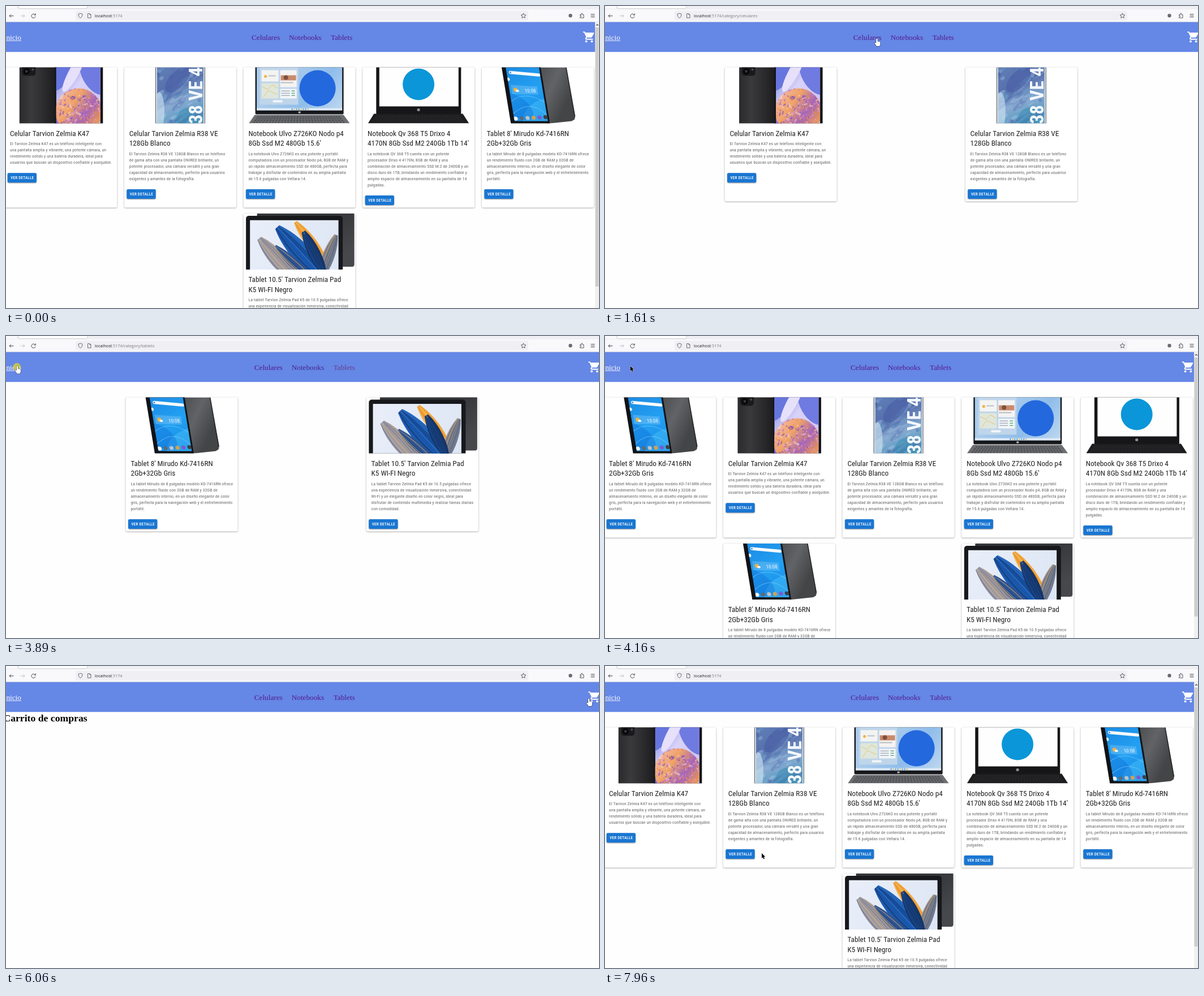
These frames come from a looping animation (1048x534 px, 8000 ms). An HTML page with a canvas:

```html
<!DOCTYPE html>
<html lang="es">
<head>
<meta charset="utf-8">
<title>Tienda</title>
<style>
html, body { margin: 0; width: 100%; height: 100%; overflow: hidden; background: #fefefe; }
canvas { display: block; }
</style>
</head>
<body>
<canvas id="stage" width="1048" height="534"></canvas>
<script>
const W = 1048, H = 534, LOOP = 8000;
const SERIF = '"Liberation Serif", "Times New Roman", serif';
const UI = '"Open Sans", "Noto Sans", sans-serif';
const PURPLE = '#551a8b', BLUE = '#6587e6';
const condensed = (size, weight = 400) =>
  `condensed ${weight} ${size}px "Roboto Condensed", Roboto, sans-serif`;

let squeeze = 0; // tighter tracking when no condensed face is installed

function setFont(c, font, track = 0) {
  const narrow = font.startsWith('condensed');
  c.fontStretch = narrow ? 'condensed' : 'normal';
  c.font = font;
  c.letterSpacing = (track + (narrow ? squeeze : 0)) * font.match(/([\d.]+)px/)[1] + 'px';
}

function write(c, str, x, y, font, color, track) {
  setFont(c, font, track);
  c.fillStyle = color;
  c.fillText(str, x, y);
  return c.measureText(str).width;
}

function rect(c, x, y, w, h, color, r = 0) {
  c.fillStyle = color;
  c.beginPath();
  c.roundRect(x, y, w, h, r);
  c.fill();
}

function disc(c, x, y, r, color, ry = r, turn = 0) {
  c.fillStyle = color;
  c.beginPath();
  c.ellipse(x, y, r, ry, turn, 0, 7);
  c.fill();
}

function poly(c, color, ...pts) {
  c.fillStyle = color;
  c.beginPath();
  for (let i = 0; i < pts.length; i += 2) c.lineTo(pts[i], pts[i + 1]);
  c.fill();
}

function line(c, d, color = '#4a4a52', width = 1) {
  c.strokeStyle = color;
  c.lineWidth = width;
  c.stroke(new Path2D(d));
}

function blend(c, x0, y0, x1, y1, ...colors) {
  const g = c.createLinearGradient(x0, y0, x1, y1);
  colors.forEach((col, i) => g.addColorStop(i / (colors.length - 1), col));
  return g;
}

function clipped(c, x, y, w, h, r, draw) {
  c.save();
  c.beginPath();
  c.roundRect(x, y, w, h, r);
  c.clip();
  draw();
  c.restore();
}

function random(seed) {
  return () => (seed = (seed * 16807) % 2147483647) / 2147483647;
}

// Product pictures, each 198 by 99

function phoneDark(c) {
  rect(c, 25.5, -5, 66, 110, blend(c, 25, 0, 90, 0, '#2a2a2c', '#3a3a3c', '#2c2c2e', '#1c1c1e'));
  rect(c, 30, -8, 24, 23, '#1a1a1c', 5);
  disc(c, 38, 7, 5.5, '#060607');
  disc(c, 38, 7, 2.5, '#30343c');
  disc(c, 49, 4, 2, '#4a4a4e');
  rect(c, 88, -5, 85, 110, '#141418');
  clipped(c, 90.5, -2, 78, 103, 0, () => {
    rect(c, 90, 0, 80, 99, blend(c, 90, 0, 168, 60, '#6f7fe2', '#d9d2f8', '#cfc5f4'));
    disc(c, 94, 6, 24, '#6676de', 40, .5);
    disc(c, 160, 12, 24, '#6f7be0', 40, -.5);
    disc(c, 122, 8, 9, '#e6e0fb', 40, .5);
    disc(c, 92, 94, 12, '#7a62d0', 26);
    c.beginPath();
    c.arc(130, 78, 41, 0, 7);
    c.clip();
    rect(c, 88, 36, 84, 64, blend(c, 95, 50, 165, 99, '#f3b3a4', '#f0a468', '#a765b8', '#ee9a4c'));
    const rnd = random(41);
    const tones = ['#f39a36', '#9a62cc', '#f9d4c4', '#f0935a', '#7b4ab2', '#e2a4d4'];
    c.globalAlpha = .6;
    for (let i = 0; i < 260; i++) {
      disc(c, 89 + rnd() * 82, 36 + rnd() * 64, .8 + rnd() * 2.8,
        tones[i % 6], .6 + rnd() * 1.4, rnd() * 3);
    }
  });
}

function phoneBlue(c) {
  rect(c, 55, -5, 88, 110, '#54585f');
  rect(c, 56, -5, 86, 110, '#d5dde4');
  clipped(c, 58, 0, 82, 99, 0, () => {
    rect(c, 58, 0, 82, 99, blend(c, 70, 0, 110, 99, '#5f7db6', '#5871ae', '#86a9d0', '#4c96bc'));
    const rnd = random(77);
    const tones = ['#465da2', '#8fb6d8', '#5874b2', '#6aa4ca', '#a9c8e2', '#4c64a8'];
    c.globalAlpha = .35;
    for (let i = 0; i < 90; i++) {
      disc(c, 58 + rnd() * 78, rnd() * 99, 3 + rnd() * 12, tones[i % 6], 1.5 + rnd() * 3, -.9 + rnd() * .5);
    }
    c.globalAlpha = .6;
    disc(c, 94, 22, 28, '#4a60a6', 14, -.8);
    disc(c, 112, 88, 20, '#3f8cb4', 16, -.6);
    disc(c, 62, 78, 9, '#d2e8f4', 34);
  });
  clipped(c, 55, 0, 88, 99, 0, () => {
    c.translate(138, 100);
    c.rotate(-Math.PI / 2);
    write(c, '38 VE 4', 0, 0, condensed(33, 700), '#f4f8fc');
  });
}

function keyboard(c, top, dark, key) {
  poly(c, dark, 20, top, 177, top, 188, 99, 9.5, 99);
  for (let row = 0; row < 4; row++) {
    const y = top + 3 + row * 3, spread = 74 + row * 2.5;
    for (let i = 0; i < 30; i++) rect(c, 98.7 - spread + i * spread / 15, y, 3.6, 1.6, key);
  }
}

function laptopBlue(c) {
  rect(c, 21, -5, 156, 88, '#17181b', 2);
  rect(c, 23.5, -5, 151, 81, blend(c, 90, 0, 174, 70, '#a9cbec', '#8fbdea', '#bcd6ef'));
  disc(c, 131, 37, 32, '#2468de');
  rect(c, 29, 0, 68, 66, '#bfd5ea');
  rect(c, 32, 5, 30, 20, '#f3f4f2', 1);
  disc(c, 39, 16, 2.5, '#f0b23c');
  rect(c, 44, 14, 13, 2, '#b9c2cc');
  rect(c, 32, 28, 30, 27, '#dfe7dc', 1);
  line(c, 'M33 34l10 5 8-8 10 6M35 53l9-12 16 7', '#e8c56c', 1);
  rect(c, 65, 5, 29, 30, '#f5f3f2', 1);
  rect(c, 66, 14, 27, 9, '#c98a6c');
  disc(c, 75, 18, 4, '#7d5140');
  rect(c, 66, 26, 22, 2, '#b8bcc4');
  rect(c, 65, 38, 29, 17, '#f3f5f8', 1);
  for (let i = 0; i < 3; i++) {
    rect(c, 67, 41 + i * 4, 15, 1.5, '#a7b1bf');
    rect(c, 85, 41 + i * 4, 6, 1.5, '#5fae7e');
  }
  rect(c, 52, 58, 17, 4, '#f2f5f8', 1);
  rect(c, 23.5, 72, 151, 4, '#dce8f4');
  for (let i = 0; i < 8; i++) rect(c, 85 + i * 4, 73, 2, 2, ['#2f7de0', '#e0a840', '#3b9a8c'][i % 3]);
  rect(c, 97, 78, 4, 3, '#b7babf');
  keyboard(c, 84, '#6c6d71', '#434448');
}

function laptopDark(c) {
  rect(c, 24, -5, 150, 88, '#161618', 2);
  rect(c, 29.5, -5, 140, 74, '#fefefe');
  disc(c, 98.8, 30, 28, '#0a96d8');
  disc(c, 98.8, 75, 2.6, '#8d9094');
  keyboard(c, 82, '#1d1d1f', '#2b2b2d');
}

function tabletGrey(c) {
  poly(c, blend(c, 100, 0, 165, 30, '#4c4d4f', '#626366', '#444547'),
    96, 0, 149, 0, 165, 87, 164, 92, 159, 95, 121, 99, 112, 99);
  line(c, 'M149 0L164.500 87', '#232425', 1.5);
  c.save();
  c.transform(1, 0, .165, 1, 0, 0);
  rect(c, 35, -3, 69, 105, '#111316');
  clipped(c, 42, -2, 59, 97, 0, () => {
    rect(c, 42, 0, 60, 96, blend(c, 42, 0, 100, 96, '#1b8be4', '#23a0f2', '#1487e2'));
    disc(c, 98, 88, 44, 'rgba(80,200,250,.4)', 30, -.5);
    disc(c, 52, 70, 30, 'rgba(10,100,210,.35)', 18, .7);
    line(c, 'M42 60Q70 40 101 62M42 82Q75 55 101 84', 'rgba(160,225,255,.45)', 1);
    c.lineCap = 'round';
    line(c, 'M49 9L98 13.500', '#f6f9fc', 5.5);
    disc(c, 49, 9, 1.5, '#4a8be0');
    disc(c, 43, 21, 3, '#e8f2fa');
    poly(c, 'rgba(255,255,255,.18)', 46, 31, 92, 34, 92, 48, 46, 47);
    disc(c, 53, 39.5, 3.5, '#f3b23e');
    disc(c, 56, 41.5, 3, '#f4f7fa', 2);
    write(c, '10:08', 69, 44, condensed(9), '#eef7ff');
    ['#f2f4f7', '#5b6b76', '#b9c3cb', '#cfa253', '#7a5ad0', '#3c3f45'].forEach((col, i) =>
      disc(c, 45 + i * 10.6, 90.500 - i * .5, 3.6, col));
  });
  c.restore();
}

// A tapered plume from its root to its tip, with streaks along it
function plume(c, seed, x0, y0, x1, y1, width, ...tones) {
  const rnd = random(seed), length = Math.hypot(x1 - x0, y1 - y0);
  const edge = s => c.bezierCurveTo(length * .3, s * width, length * .75, s * width * .8, length, s * width * .2);
  c.save();
  c.translate(x0, y0);
  c.rotate(Math.atan2(y1 - y0, x1 - x0));
  c.beginPath();
  c.moveTo(0, 0);
  edge(-1);
  c.lineTo(length * .94, 0);
  c.lineTo(length, width * .2);
  c.bezierCurveTo(length * .75, width * .8, length * .3, width, 0, 0);
  c.fillStyle = tones[0];
  c.fill();
  c.globalAlpha = .55;
  for (let i = 0; i < width * 1.5; i++) {
    c.strokeStyle = tones[i % tones.length];
    c.lineWidth = .8 + rnd() * 1.2;
    c.beginPath();
    c.moveTo(0, 0);
    edge(rnd() * 2 - 1);
    c.stroke();
  }
  c.restore();
}

function tabletFeather(c) {
  rect(c, 24, -2, 172, 96, blend(c, 160, 0, 196, 60, '#35363a', '#47484c'), 4);
  rect(c, 4.5, 4, 171, 105, '#17181b', 5);
  clipped(c, 11.5, 11.5, 156.5, 88, 1, () => {
    rect(c, 11.5, 11.5, 157, 88, blend(c, 12, 12, 168, 99, '#e9eef9', '#dde6f4'));
    plume(c, 3, 100, 125, 28, 44, 20, '#a89c98', '#c8b294', '#8894b4', '#6a7698');
    plume(c, 5, 150, 92, 92, 15, 14, '#f0a030', '#e8932a', '#f5bd66');
    plume(c, 11, 134, 120, 164, 38, 15, '#6f7890', '#c79a62', '#2d5288', '#b9a590');
    plume(c, 7, 150, 122, 60, 24, 24, '#1c5cb2', '#134a9c', '#2f74c6', '#173a72');
    plume(c, 9, 146, 112, 106, 32, 15, '#16386e', '#1d4d92', '#122b56');
    plume(c, 13, 128, 122, 56, 58, 12, '#274c8a', '#365f9e', '#c8a878');
  });
}

const products = {
  dark: { art: phoneDark, title: ['Celular Tarvion Zelmia K47'], body: [
    'El Tarvion Zelmia K47 es un teléfono inteligente con',
    'una pantalla amplia y vibrante, una potente cámara, un',
    'rendimiento sólido y una batería duradera, ideal para',
    'usuarios que buscan un dispositivo confiable y asequible.'] },
  blue: { art: phoneBlue, title: ['Celular Tarvion Zelmia R38 VE', '128Gb Blanco'], body: [
    'El Tarvion Zelmia R38 VE 128GB Blanco es un teléfono',
    'de gama alta con una pantalla ONIRED brillante, un',
    'potente procesador, una cámara versátil y una gran',
    'capacidad de almacenamiento, perfecto para usuarios',
    'exigentes y amantes de la fotografía.'] },
  slim: { art: laptopBlue, title: ['Notebook Ulvo Z726KO Nodo p4', "8Gb Ssd M2 480Gb 15.6'"], body: [
    'La notebook Ulvo Z726KO es una potente y portátil',
    'computadora con un procesador Nodo p4, 8GB de RAM y',
    'un rápido almacenamiento SSD de 480GB, perfecta para',
    'trabajar y disfrutar de contenidos en su amplia pantalla',
    'de 15.6 pulgadas con Veltara 14.'] },
  work: { art: laptopDark, title: ['Notebook Qv 368 T5 Drixo 4', "4170N 8Gb Ssd M2 240Gb 1Tb 14'"], body: [
    'La notebook QV 368 T5 cuenta con un potente',
    'procesador Drixo 4 4170N, 8GB de RAM y una',
    'combinación de almacenamiento SSD M.2 de 240GB y un',
    'disco duro de 1TB, brindando un rendimiento confiable y',
    'amplio espacio de almacenamiento en su pantalla de 14',
    'pulgadas.'] },
  grey: { art: tabletGrey, title: ["Tablet 8' Mirudo Kd-7416RN", '2Gb+32Gb Gris'], body: [
    'La tablet Mirudo de 8 pulgadas modelo KD-7416RN ofrece',
    'un rendimiento fluido con 2GB de RAM y 32GB de',
    'almacenamiento interno, en un diseño elegante de color',
    'gris, perfecta para la navegación web y el entretenimiento',
    'portátil.'] },
  feather: { art: tabletFeather, title: ["Tablet 10.5' Tarvion Zelmia Pad", 'K5 WI-FI Negro'], body: [
    'La tablet Tarvion Zelmia Pad K5 de 10.5 pulgadas ofrece',
    'una experiencia de visualización inmersiva, conectividad',
    'Wi-Fi y un elegante diseño en color negro, ideal para',
    'disfrutar de contenido multimedia y realizar tareas diarias',
    'con comodidad.'] },
};

function card(c, name, x, y, h) {
  const { art, title, body } = products[name];
  c.save();
  c.shadowColor = 'rgba(0,0,0,.38)';
  c.shadowBlur = 2.5;
  c.shadowOffsetY = .8;
  rect(c, x, y, 198, h, '#fff', 2.2);
  c.restore();
  clipped(c, x, y, 198, 99, [2.2, 2.2, 0, 0], () => {
    c.translate(x, y);
    art(c);
  });
  title.forEach((s, i) => write(c, s, x + 8.8, y + 121 + i * 17.7, condensed(13.26), '#212121'));
  const top = y + 137.3 + (title.length - 1) * 17.7;
  body.forEach((s, i) => write(c, s, x + 8.8, top + i * 11.05, condensed(7.73), '#666', .0107));
  const by = top + 5.2 + body.length * 11.05;
  c.save();
  c.shadowColor = 'rgba(0,0,0,.4)';
  c.shadowBlur = 2;
  c.shadowOffsetY = 1;
  rect(c, x + 4.4, by, 51.3, 17, '#1976d2', 2.2);
  c.restore();
  write(c, 'VER DETALLE', x + 9.9, by + 11.1, condensed(7.18, 500), '#fff', .0286);
}

function browserBar(c, path, reader) {
  rect(c, 0, 0, W, 6, '#f0f0f4');
  rect(c, 0, 6, W, 22, '#f9f9fb');
  rect(c, 0, 0, 19.5, 4.5, '#fafafc');
  c.save();
  c.shadowColor = 'rgba(0,0,0,.4)';
  c.shadowBlur = 2;
  rect(c, 22, -6, 121.5, 10, '#fff', 2);
  c.restore();
  rect(c, 123, 8.500, 800, 17, '#f0f0f4', 2);
  line(c, 'M13.500 17.500H6M9 14.500l-3 3 3 3');
  line(c, 'M25.500 17.500H33M30 14.500l3 3-3 3', '#c3c3c8');
  line(c, 'M51.500 15.500a3.600 3.600 0 1 0 .6 3M52.400 13.200v2.800h-2.800');
  line(c, 'M131.500 13l3.600 1.300q.2 5-3.600 7.200q-3.800-2.200-3.600-7.200z', '#5b5b62', .9);
  line(c, 'M144.500 13.500h3.500l2 2v5.500h-5.500zM148 13.500v2h2', '#5b5b62', .9);
  const host = write(c, 'localhost', 157, 20, `7.2px ${UI}`, '#1c1b22');
  write(c, ':5174' + path, 157 + host, 20, `7.2px ${UI}`, '#77777e');
  line(c, 'M914.500 12.800l1.300 2.800 3 .4-2.200 2.100.5 3-2.600-1.500-2.600 1.500.5-3-2.200-2.100 3-.4z', '#4a4a52', .9);
  if (reader) line(c, 'M896 13.500h6.500v7.500H896zM897.500 15.800h3.500M897.500 17.500h3.500M897.500 19.200h2', '#4a4a52', .9);
  disc(c, 997.500, 17, 3.2, '#6b6b74');
  line(c, 'M1014.500 15.500h2v-1.500a1.200 1.200 0 0 1 2.400 0v1.500h2.100v5.500h-6.500v-1.800h1a1.100 1.100 0 0 0 0-2.200h-1z', '#4a4a52', .9);
  line(c, 'M1033.500 14.500h7M1033.500 17h7M1033.500 19.500h7', '#4a4a52', .9);
}

function cart(c, x) {
  c.save();
  c.translate(x, 43.2);
  c.scale(.97, .97);
  c.fillStyle = '#fff';
  c.fill(new Path2D('M1 2v2h2l3.600 7.600-1.350 2.450C4.500 15.400 5.500 17 7 17h12v-2H7.420' +
    'q-.3-.1-.22-.37l.9-1.630h7.450q1.200 0 1.750-1.030l3.580-6.490Q21.300 4 20 4H5.210l-.94-2z'));
  disc(c, 7, 20, 2, '#fff');
  disc(c, 17, 20, 2, '#fff');
  c.restore();
}

const column = i => -1.7 + 210.65 * i;
const row = (names, y, h) => names.flatMap((n, i) => n ? [[n, column(i), y, h]] : []);
const pair = (a, b, h) => [[a, 211.6, 108.5, h], [b, 636.8, 108.5, h]];

const HOME = { path: '', home: true, cards: [
  ...row(['dark', 'blue', 'slim', 'work', 'grey'], 108.5, 248),
  ...row([, , 'feather'], 367, 248)] };
const HOME_REPEAT = { path: '', home: true, cards: [
  ...row(['grey', 'dark', 'blue', 'slim', 'work'], 108.5, 248),
  ...row([, 'grey', , 'feather'], 367, 248)] };
const PHONES = { path: '/category/celulares', cards: pair('dark', 'blue', 237) };
const NOTEBOOKS = { path: '/category/notebooks', reader: true, cards: pair('slim', 'work', 248) };
const TABLETS = { path: '/category/tablets', cards: pair('grey', 'feather', 237) };
const CART = { path: '', heading: 'Carrito de compras', cards: [] };

const schedule = [[0, HOME], [1470, PHONES], [2350, NOTEBOOKS], [3090, TABLETS],
  [4030, HOME_REPEAT], [6060, CART], [7020, HOME]];

function render(page) {
  const canvas = document.createElement('canvas');
  canvas.width = W;
  canvas.height = H;
  const c = canvas.getContext('2d');
  rect(c, 0, 0, W, H, '#fefefe');
  page.cards.forEach(args => card(c, ...args));
  if (page.heading) write(c, page.heading, -4.6, 98, `bold 17.68px ${SERIF}`, '#000');
  browserBar(c, page.path, page.reader);
  rect(c, 0, 28.2, W, 53, BLUE);
  rect(c, 0, 27.7, W, .5, '#ccc');
  write(c, 'Inicio', -4, 59.5, `13.26px ${SERIF}`, '#fff');
  rect(c, 0, 61, 27, .8, '#fff');
  cart(c, page.home ? 1018.8 : 1028.2);
  if (page.home) {
    rect(c, 1041, 28, 7, H - 28, '#f0f0f0');
    rect(c, 1041.5, 38, 6, 458, '#cdcdcd');
    line(c, 'M1043 34.500l2-2 2 2', '#505050', 1.1);
  }
  return canvas;
}

// Time ranges in which the screen refreshes: start, end, number of updates
const refresh = [[0, 0, 1], [200, 980, 12], [1050, 1330, 5], [1470, 1950, 8], [2350, 3090, 11],
  [3160, 3890, 12], [4030, 4800, 12], [4870, 5630, 12], [5700, 5770, 2], [5920, 5920, 1],
  [6060, 6810, 12], [6880, 7620, 12], [7690, 7960, 5]];
const SLACK = 10; // updates are spaced unevenly by up to this many ms

function held(t) {
  const [a, b, n] = refresh.findLast(r => t >= r[0]);
  if (n === 1) return a;
  const step = (b - a) / (n - 1);
  return a + Math.min(n - 1, Math.floor((t - a + SLACK) / step)) * step;
}

// Pointer tip: time, x, y
const route = [[200, 1003, 508], [980, 485, 60], [1120, 498, 58], [1330, 480.5, 58],
  [1610, 480.5, 57.5], [1950, 526, 58], [2420, 526, 58], [2880, 590, 57.5], [3085, 590, 57.5],
  [3090, 535, 55], [3820, 20, 53], [4100, 20, 53], [4800, 900, 50], [5200, 1012, 54],
  [5630, 1021, 57], [5700, 1025, 56], [5770, 1030, 57.5], [6130, 1030, 57.5],
  [6810, 20, 55], [7020, 20, 55], [7620, 404, 247], [7960, 277, 331]];
const clicks = [[1330, 1470], [1950, 2350], [3890, 4030], [5920, 6060], [6880, 7020]];

function pointerAt(t) {
  const i = route.findLastIndex(p => t >= p[0]);
  const [t0, x0, y0] = route[i], [t1, x1, y1] = route[i + 1] || [LOOP, x0, y0];
  const k = (t - t0) / (t1 - t0), e = k * k * (3 - 2 * k);
  return [x0 + (x1 - x0) * e, y0 + (y1 - y0) * e];
}

const hand = new Path2D('M-1.300 8V1.200Q-1.300 0 0 0Q1.200 0 1.200 1.200V5L4.600 5.600Q6 6 6 7.500V9.500' +
  'Q6 11 5 12.500V13.500H-1V12.500L-3.800 8.800Q-4.400 7.300-3 7.200Z');
const arrow = new Path2D('M0 0V9L2 7.200L3.500 10.600L5 10L3.600 6.600H6.300Z');

const stage = document.getElementById('stage').getContext('2d');
const fontWidth = () => stage.measureText('Notebook pantalla').width;
setFont(stage, condensed(100));
const narrowWidth = fontWidth();
setFont(stage, '100px Roboto, sans-serif');
if (narrowWidth > fontWidth() * .95) squeeze = -.06;
const views = schedule.map(([, page]) => render(page));

function linkColor(name, t) {
  if (name === 'Notebooks' && t >= 1810 && t < 4030) return t < 2560 ? '#e01020' : '#45268f';
  if (name === 'Tablets' && t >= 2790 && t < 4030) return t < 3090 ? '#e01020' : '#683f8c';
  return PURPLE;
}

function draw(now) {
  const t = held(now % LOOP);
  const index = schedule.findLastIndex(s => t >= s[0] - SLACK);
  const shift = schedule[index][1].home ? 0 : 4.7;
  stage.drawImage(views[index], 0, 0);

  const links = [['Celulares', 434], ['Notebooks', 500], ['Tablets', 574]].map(([name, x]) =>
    [x + shift, x + shift + write(stage, name, x + shift, 59.5, `13.26px ${SERIF}`, linkColor(name, t))]);

  if (t >= 200) {
    const [x, y] = pointerAt(t);
    if (clicks.some(([a, b]) => t >= a - SLACK && t < b - SLACK)) disc(stage, x - .7, y + 1.5, 6.8, 'rgba(222,214,40,.75)');
    const over = y > 46 && y < 63 && [[0, 27], [1023, W], ...links].some(([a, b]) => x >= a && x <= b);
    stage.save();
    stage.translate(x, y);
    stage.lineJoin = 'round';
    stage.lineWidth = .9;
    stage.strokeStyle = over ? '#111' : '#fff';
    stage.fillStyle = over ? '#fff' : '#000';
    stage.stroke(over ? hand : arrow);
    stage.fill(over ? hand : arrow);
    stage.restore();
  }
  requestAnimationFrame(draw);
}
requestAnimationFrame(draw);
</script>
</body>
</html>
```
